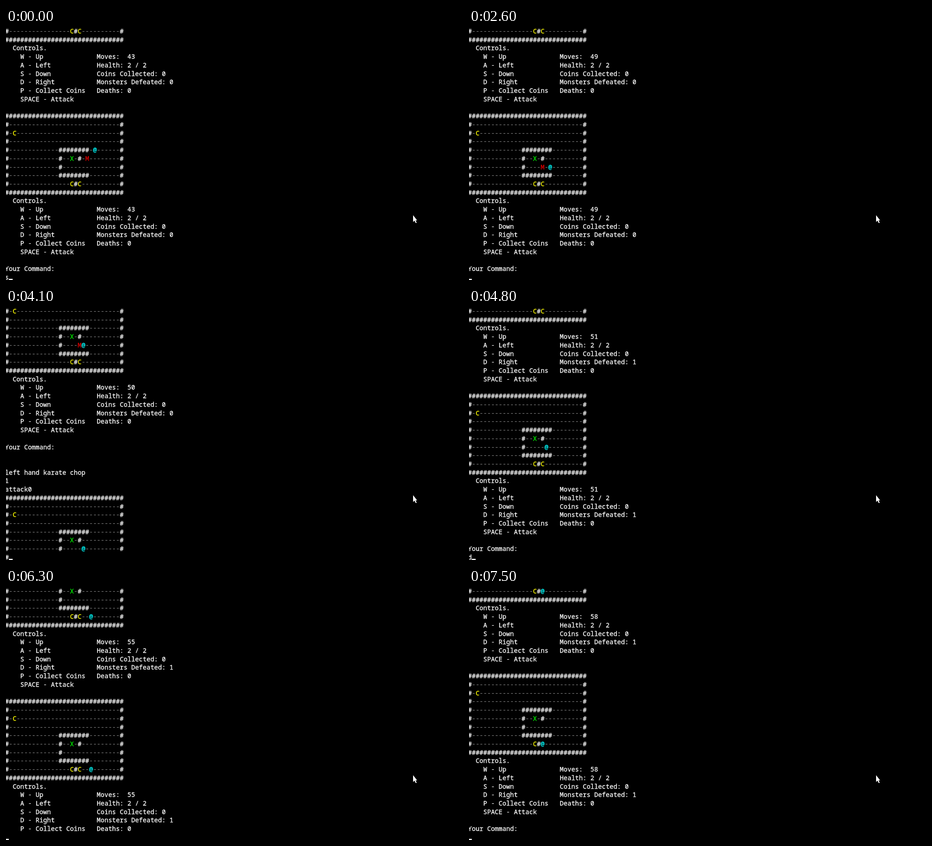
An HTML page with a canvas for the animation above (8000 ms loop, 1007x556 px).

```html
<!DOCTYPE html>
<html lang="en">
<head>
<meta charset="utf-8">
<title>Terminal dungeon</title>
<style>
  html, body { margin: 0; width: 100%; height: 100%; overflow: hidden; background: #000; }
  canvas { display: block; }
</style>
</head>
<body>
<canvas id="screen" width="1007" height="556"></canvas>
<script>
const ctx = document.getElementById('screen').getContext('2d');
const LOOP = 8000, ROWS = 30;
const CELL_W = 8.43, CELL_H = 18.72, LEFT = -2.2, BASELINE = 12;
const COLORS = { '-': '#808080', C: '#ffff00', X: '#00ff00', M: '#e00000', '@': '#00ffff' };

const WALL = '#'.repeat(31);
const OPEN = '#' + '-'.repeat(29) + '#';
const put = (row, col, text) => row.slice(0, col) + text + row.slice(col + text.length);
const MAP = [
  WALL, OPEN, put(OPEN, 2, 'C'), OPEN,
  put(OPEN, 14, '########'),
  put(OPEN, 14, '#--X-#'),
  put(OPEN, 14, '#'),
  put(OPEN, 14, '########'),
  put(OPEN, 17, 'C#C'),
  WALL
];

// Positions as [row, column], starting at move 43
const FIRST_MOVE = 43;
const HERO = [[4, 23], [5, 23], [6, 23], [6, 22], [6, 23], [6, 22], [6, 21], [6, 20],
              [6, 20], [6, 21], [6, 22], [7, 22], [8, 22], [8, 21], [8, 20], [8, 19]];
const MONSTER = [[5, 21], [5, 21], [5, 21], [5, 20], [6, 20], [6, 20], [6, 19], [6, 19]];

function block(move) {
  const board = [...MAP];
  const place = (pos, mark) => { if (pos) board[pos[0]] = put(board[pos[0]], pos[1], mark); };
  place(MONSTER[move - FIRST_MOVE], 'M');
  place(HERO[move - FIRST_MOVE], '@');
  const stat = (control, value) => '    ' + control.padEnd(20) + value;
  return [
    ...board,
    '  Controls.',
    stat('W - Up', 'Moves:  ' + move),
    stat('A - Left', 'Health: 2 / 2'),
    stat('S - Down', 'Coins Collected: 0'),
    stat('D - Right', 'Monsters Defeated: ' + (move > 50 ? 1 : 0)),
    stat('P - Collect Coins', 'Deaths: 0'),
    stat('SPACE - Attack', ''),
    ''
  ];
}

const PROMPT = 'Your Command:';
const ready = (move, typed = '') => [...block(move), ...block(move), PROMPT, typed];
const printing = move => [...ready(move).slice(0, -4), ''];
const attacking = () => [...block(50), PROMPT, '', '', 'left hand karate chop', '1', 'attack0',
                         ...block(51).slice(0, 7), '#'];

const TIMELINE = [
  [0, ready(43, 's')], [100, ready(44)],
  [700, printing(45)], [800, ready(45)],
  [1200, ready(45, 'a')], [1300, ready(46)],
  [1700, ready(47)], [2100, ready(48)], [2600, ready(49)],
  [3100, printing(50)], [3200, ready(50)],
  [4100, attacking()], [4200, ready(51)],
  [4800, ready(51, 'd')], [4900, ready(52)],
  [5300, printing(53)], [5400, ready(53)],
  [6100, printing(54)], [6200, ready(54)],
  [6300, printing(55)], [6400, ready(55)],
  [6500, ready(55, 'a')], [6600, ready(56)],
  [6800, ready(57)],
  [7400, printing(58)], [7500, ready(58)]
];

const pointer = new Path2D('M897 413V428L900 425L903 430.5L905 429.5L902.5 424.5H906Z');

function draw(lines) {
  ctx.fillStyle = '#000';
  ctx.fillRect(0, 0, 1007, 556);
  ctx.font = '14px "Noto Sans Mono", monospace';
  ctx.lineWidth = 0.3;
  ctx.lineJoin = 'round';
  lines.slice(-ROWS).forEach((line, row) => {
    const isBoard = line[0] === '#';
    const y = Math.round(BASELINE + row * CELL_H);
    [...line].forEach((char, col) => {
      const x = LEFT + col * CELL_W;
      ctx.fillStyle = ctx.strokeStyle = isBoard && COLORS[char] || '#fff';
      ctx.fillText(char, x, y);
      // A hairline outline gives the letters their heavier console weight
      if (char !== '-') ctx.strokeText(char, x, y);
    });
  });
  ctx.fillStyle = '#fff';
  ctx.fillRect(LEFT + lines.at(-1).length * CELL_W, 553.5, CELL_W, 2.5);
  ctx.fill(pointer);
}

function tick() {
  const time = performance.now() % LOOP;
  draw(TIMELINE.findLast(([start]) => start <= time)[1]);
  requestAnimationFrame(tick);
}
tick();
</script>
</body>
</html>
```
